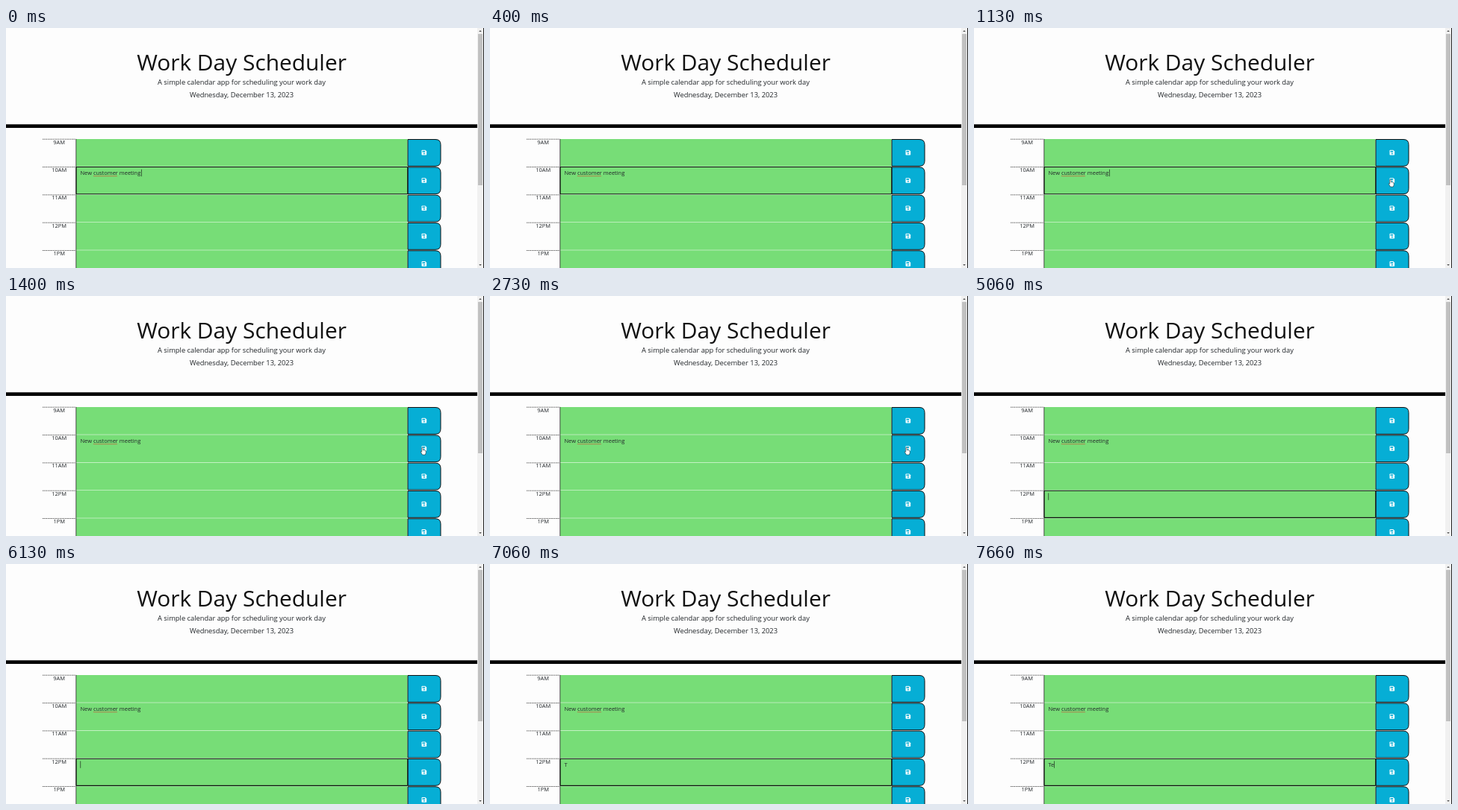
Write an HTML page that moves like this. It is 640 px wide and 322 px high and loops after 8 s.

```html
<!DOCTYPE html>
<html lang="en">
<head>
<meta charset="utf-8">
<title>Work Day Scheduler</title>
<style>
  html, body { margin: 0; width: 100%; height: 100%; overflow: hidden; background: #fdfdfd; }
  svg { display: block; width: 640px; height: 322px; font-family: "Open Sans", sans-serif; font-size: 7.467px; fill: #212529; }
  .mid { text-anchor: middle; }
  .lead { font-size: 9.333px; }
  .title { font-size: 29.87px; fill: #111; }
  .slot { fill: #77dd77; }
  .button { fill: #06aed5; stroke: #111; stroke-width: 1; }
  .focus { fill: none; stroke: #111; stroke-width: 1.1; }
</style>
</head>
<body>
<svg viewBox="0 0 640 322">
  <defs>
    <g id="disk">
      <path d="M-2.6-3.3H1.6L3.3-1.6V2.6Q3.3 3.3 2.6 3.3H-2.6Q-3.3 3.3-3.3 2.6V-2.6Q-3.3-3.3-2.6-3.3Z" fill="#fff"/>
      <path d="M-2.3-2.3H1.4V-.5H-2.3Z" fill="#06aed5"/>
      <circle cy="1.3" r="1" fill="#06aed5"/>
    </g>
  </defs>
  <text class="mid title" x="315.5" y="57">Work Day Scheduler</text>
  <text class="mid lead" x="315.5" y="75.7">A simple calendar app for scheduling your work day</text>
  <text class="mid lead" x="315.5" y="92.7">Wednesday, December 13, 2023</text>
  <path d="M0 129.3H631V134H0Z" fill="#000"/>
  <g id="rows"></g>
  <text x="99.5" y="197.2">New <tspan id="misspelt">customer</tspan> meeting</text>
  <path id="squiggle" fill="none" stroke="#d8392b" stroke-width=".6"/>
  <text id="typed" x="99.5" y="271.9"></text>
  <rect id="focus" class="focus" x="94" width="443.8" height="36.2" rx=".8"/>
  <rect id="caret" width=".6" height="9.4" fill="#111"/>
  <path id="hand" fill="#fff" stroke="#111" stroke-width=".5" stroke-linejoin="round"
    d="M1.5.7Q1.5 0 2.2 0T2.9.7V3.8Q4.1 3.2 4.4 4.1 5.4 3.7 5.8 4.6 7 4.3 7 5.5V7.5L6.1 10H2.4L.2 6.6Q-.2 5.5.7 5.5L1.5 6.3Z"/>
  <path d="M631 0H639V322H631Z" fill="#f1f1f1"/>
  <path d="M632 8H638V211H632Z" fill="#c1c1c1"/>
  <path d="M633.2 5 635 3 636.8 5ZM633.2 317 635 319 636.8 317Z" fill="#505050"/>
  <path d="M639 0H640V322H639Z" fill="#222"/>
</svg>
<script>
const LOOP = 8000, TOP = 149, PITCH = 37.33, BLINK = 535;
const $ = id => document.getElementById(id);
const rowY = i => TOP + i * PITCH;

$('rows').innerHTML = ['9AM', '10AM', '11AM', '12PM', '1PM'].map((hour, i) => {
  const y = rowY(i);
  return `<g transform="translate(0 ${y})">
    <path d="M49 .2H93.5" stroke="#111" stroke-width=".7" stroke-dasharray="1.4 .9"/>
    <text class="mid" x="71.2" y="6.8">${hour}</text>
    <path class="slot" d="M94 0H537.5V36.8H94Z"/>
    <path d="M93.8 0V37.3" stroke="#222" stroke-width=".8"/>
    <path class="button" d="M538 .5H575Q582 .5 582 7.5V29.3Q582 36.3 575 36.3H538Z"/>
    <use href="#disk" x="559.8" y="18.1"/>
  </g>`;
}).join('');

const show = (el, on) => el.setAttribute('visibility', on ? 'visible' : 'hidden');

function drawSquiggle() {
  const word = $('misspelt');
  const x = word.getStartPositionOfChar(0).x;
  const end = word.getEndPositionOfChar(7).x;
  let d = `M${x} 199`;
  for (let k = 1; x + k < end; k++) d += `L${x + k} ${k % 2 ? 198.2 : 199.2}`;
  $('squiggle').setAttribute('d', d);
}

// Active row, time at which its caret last restarted, and typed text
function editor(t) {
  if (t < 1330) return { row: 1, since: -210, text: '' };
  if (t < 5060) return { row: -1, since: 0, text: '' };
  if (t < 6460) return { row: 3, since: 5060, text: '' };
  if (t < 7330) return { row: 3, since: 6460, text: 'T' };
  return { row: 3, since: 7330, text: 'Te' };
}

function drawHand(t) {
  show($('hand'), t >= 1000 && t < 3900);
  const arrive = Math.min(1, Math.max(0, (t - 1000) / 130));
  const leave = Math.max(0, (t - 3800) / 100);
  const x = 555.2 - 14 * (1 - arrive) ** 2 - 16 * leave;
  $('hand').setAttribute('transform', `translate(${x} ${203 + 6 * leave})`);
}

function frame(now) {
  const t = now % LOOP;
  const { row, since, text } = editor(t);
  const typed = $('typed');
  if (typed.textContent !== text) typed.textContent = text;

  show($('focus'), row >= 0);
  $('focus').setAttribute('y', rowY(row) + .2);

  // The first stretch begins partway through a visible blink
  show($('caret'), row >= 0 && Math.floor((t - since) / BLINK) % 2 === 0);
  $('caret').setAttribute('x', row === 1 ? 181 : 99.5 + typed.getComputedTextLength());
  $('caret').setAttribute('y', rowY(row) + 3.4);

  drawHand(t);
  requestAnimationFrame(frame);
}

drawSquiggle();
requestAnimationFrame(frame);
</script>
</body>
</html>
```
